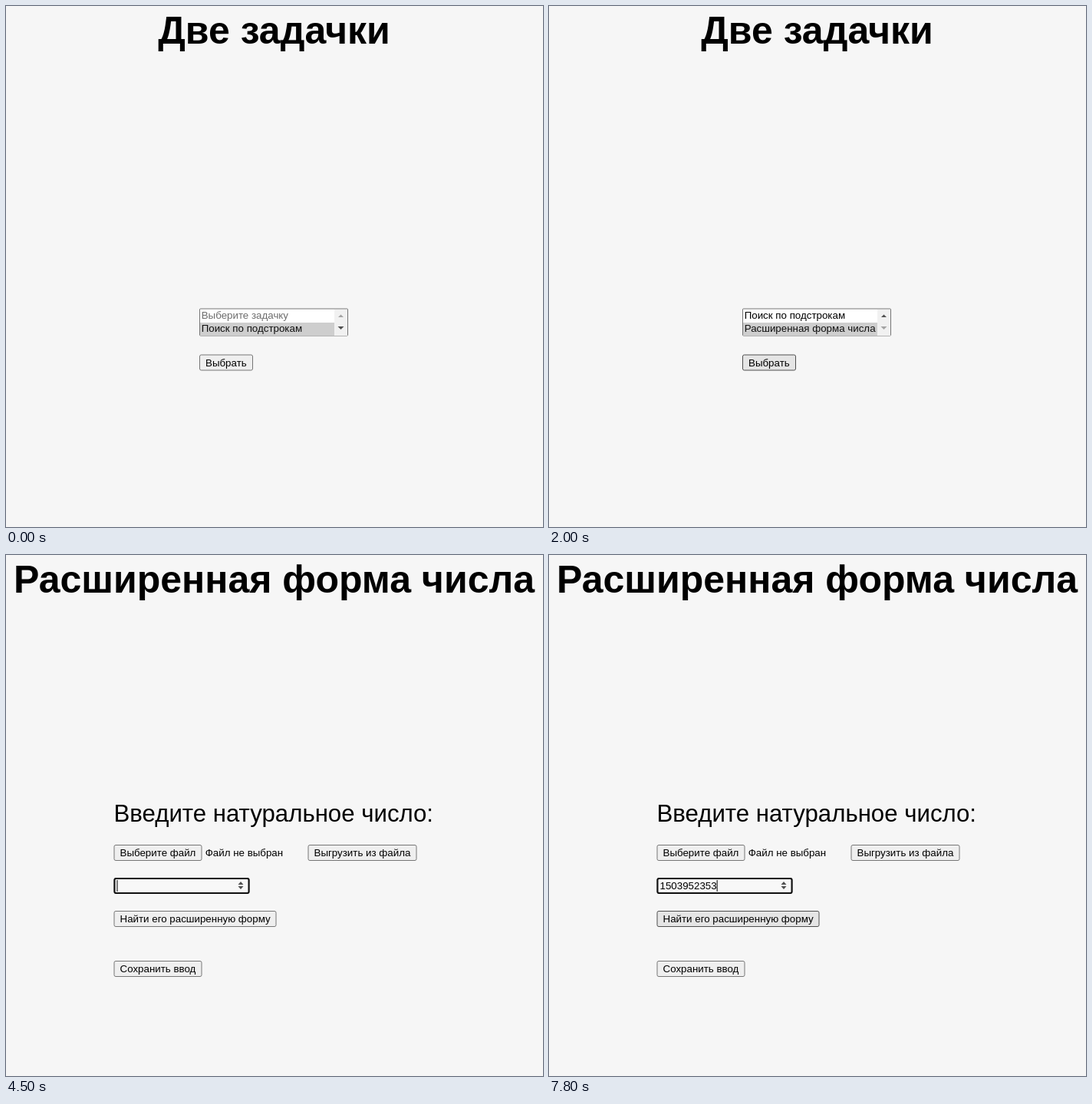
These frames come from a looping animation (700x678 px, 8 s). An HTML page:

```html
<!DOCTYPE html>
<html lang="ru">
<head>
<meta charset="utf-8">
<title>Две задачки</title>
<style>
  html, body { margin: 0; width: 100%; height: 100%; overflow: hidden; background: #f6f6f6; }
  svg { display: block; font: 13.333px "Liberation Sans", Arial, sans-serif; }
  .title { font-size: 50px; font-weight: bold; text-anchor: middle; }
  .label { font-size: 31.2px; }
  .box { fill: #fff; stroke: #767676; }
  #field { fill: #f8f8f8; }
  .button rect { fill: #efefef; stroke: #767676; }
  .button.hover rect { fill: #e5e5e5; stroke: #4f4f4f; }
  .box.hover { stroke: #4f4f4f; }
  .ring { fill: none; stroke: #101010; stroke-width: 2; }
  .spinner { fill: #505050; }
</style>
</head>
<body>
<svg width="700" height="678" viewBox="0 0 700 678">
  <defs><clipPath id="listClip"><path d="M253 395h175v34h-175z"/></clipPath></defs>

  <g id="menuPage">
    <text class="title" x="349.5" y="49">Две задачки</text>
    <rect class="box" x="252.5" y="394" width="193" height="35" rx="1"/>
    <g clip-path="url(#listClip)"><g id="options"></g></g>
    <path d="M428 395h17v34h-17z" fill="#f1f1f1"/>
    <path id="downButton" d="M428 412h17v16h-17z"/>
    <path id="upArrow" d="M433 405h7l-3.5-3.5z"/>
    <path id="downArrow" d="M432.5 417h8l-4 4z"/>
    <rect id="listRing" class="ring" x="253" y="394.5" width="192" height="34" rx="2"/>
    <g id="choose"></g>
  </g>

  <g id="numberPage">
    <text class="title" x="349.5" y="49">Расширенная форма числа</text>
    <text class="label" x="140.5" y="347">Введите натуральное число:</text>
    <g id="pickFile"></g>
    <text x="259.7" y="392">Файл не выбран</text>
    <g id="loadFile"></g>
    <rect id="field" class="box" x="141" y="420.5" width="176" height="20" rx="2"/>
    <rect id="fieldRing" class="ring" x="141.5" y="421" width="175" height="19" rx="2"/>
    <path id="spinner" class="spinner" d="M302.5 429h7l-3.5-4zM302.5 431h7l-3.5 4z"/>
    <text id="digits" x="144.5" y="435"></text>
    <rect id="caret" y="423" width="1" height="15"/>
    <g id="expand"></g>
    <g id="save"></g>
  </g>
</svg>
<script>
const LOOP = 8000;
const NUMBER = '1503952353';
const KEY_TIMES = [5400, 5700, 6000, 6200, 6500, 6700, 7000, 7300, 7500, 7800];
const DIGIT_WIDTH = 7.415;
const ROW = 17;

const $ = id => document.getElementById(id);
const show = (id, on) => { $(id).style.display = on ? '' : 'none'; };
const hover = (id, on) => $(id).classList.toggle('hover', on);
const fill = (id, color) => $(id).setAttribute('fill', color);

function button(id, x, y, width, label) {
  $(id).setAttribute('class', 'button');
  $(id).innerHTML =
    `<rect x="${x + .5}" y="${y + .5}" width="${width - 1}" height="20" rx="2"/>` +
    `<text x="${x + 8}" y="${Math.round(y + 15)}">${label}</text>`;
}
button('choose', 252, 453.5, 70, 'Выбрать');
button('pickFile', 140.5, 377, 115, 'Выберите файл');
button('loadFile', 393.5, 377, 142, 'Выгрузить из файла');
button('expand', 140.5, 463, 212, 'Найти его расширенную форму');
button('save', 140.5, 528, 115, 'Сохранить ввод');

$('options').innerHTML = ['Выберите задачку', 'Поиск по подстрокам', 'Расширенная форма числа']
  .map((label, i) =>
    `<rect x="253" y="${395 + ROW * i}" width="175" height="${ROW}"/>` +
    `<text x="254.7" y="${407 + ROW * i}">${label}</text>`).join('');
const rows = [...$('options').querySelectorAll('rect')];
const labels = [...$('options').querySelectorAll('text')];

function drawMenu(t) {
  const focused = t >= 900 && t < 2000;
  const selected = t < 1500 ? 1 : 2;
  const scroll = t < 900 ? 0 : t < 1000 ? 7 : ROW;
  const atEnd = scroll === ROW;
  $('options').setAttribute('transform', `translate(0 ${-scroll})`);
  rows.forEach((row, i) => {
    const on = i === selected;
    row.setAttribute('fill', !on ? '#fff' : focused ? '#1e90ff' : '#cecece');
    labels[i].setAttribute('fill', on ? (focused ? '#fff' : '#101010') : i ? '#000' : '#6d6d6d');
  });
  const pressed = t >= 900 && !atEnd;
  const hovered = t >= 600 && t < 900;
  fill('downButton', pressed ? '#787878' : hovered ? '#d2d2d2' : '#f1f1f1');
  fill('downArrow', atEnd ? '#a3a3a3' : pressed ? '#fff' : hovered ? '#000' : '#505050');
  fill('upArrow', scroll ? '#505050' : '#a3a3a3');
  show('listRing', focused);
  hover('choose', t >= 1700);
}

function drawNumber(t) {
  const typed = KEY_TIMES.filter(k => t >= k).length;
  const focused = t >= 4500;
  $('digits').textContent = NUMBER.slice(0, typed);
  $('caret').setAttribute('x', 144.5 + DIGIT_WIDTH * typed);
  show('caret', focused && (t < 5000 || typed > 0));
  show('fieldRing', focused);
  show('spinner', t >= 2900);
  hover('field', t >= 2900);
  hover('expand', t >= 7800);
}

function frame(now) {
  const t = now % LOOP;
  const menu = t < 2200;
  show('menuPage', menu);
  show('numberPage', !menu);
  (menu ? drawMenu : drawNumber)(t);
  requestAnimationFrame(frame);
}
frame(performance.now());
</script>
</body>
</html>
```
